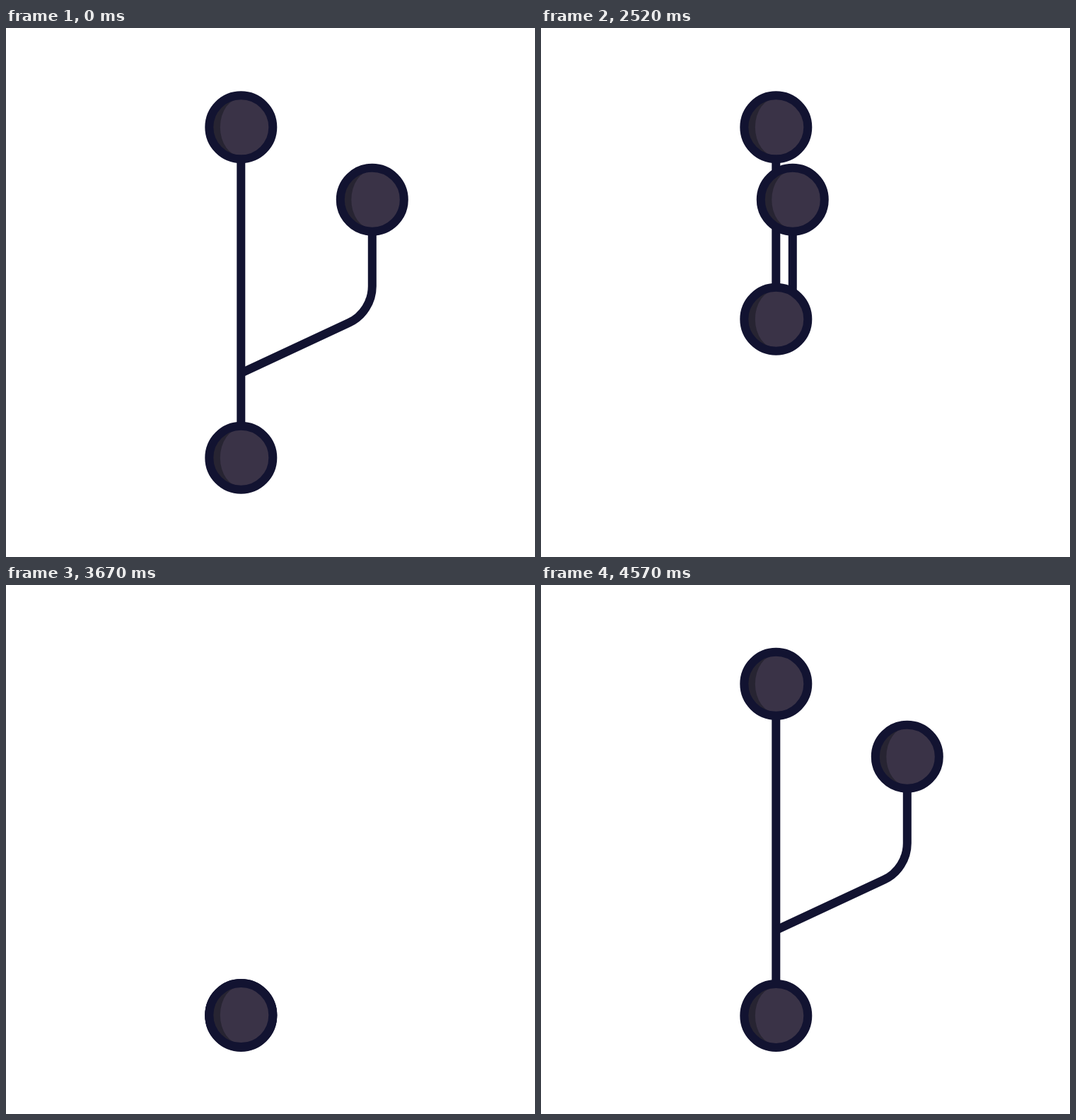
Animation of 748 by 748 pixels, one loop 4.6 s. Source, as an HTML page:

```html
<!DOCTYPE html>
<html lang="en">
<head>
<meta charset="utf-8">
<title>Branch</title>
<style>
  html, body { margin: 0; height: 100%; overflow: hidden; background: #fff; }
  svg { display: block; width: 100vw; height: 100vh; }
  .line, .ring { fill: none; stroke: #121331; stroke-width: 12; }
  .shade { fill: #272432; }
  .light { fill: #3a3347; }
</style>
</head>
<body>
<svg viewBox="0 0 748 748">
  <path id="trunk" class="line"/>
  <path id="branch" class="line"/>
  <g id="bottom"></g>
  <g id="top"></g>
  <g id="tip"></g>
</svg>
<script>
const LOOP = 4600, X = 332.3, TIP_X = 517.8, RADIUS = 45;
const TOP_Y = 140.3, TIP_Y = 242.7, APEX_Y = 105.3, FLOOR_Y = 609;
const VANISH = 3375, SPLIT = 3920;

const [trunk, branch, bottom, top_, tip] =
  ['trunk', 'branch', 'bottom', 'top', 'tip'].map(id => document.getElementById(id));

const mix = (a, b, p) => a + (b - a) * p;
const progress = (t, start, end) => Math.min(1, Math.max(0, (t - start) / (end - start)));
const cubicInOut = u => u < .5 ? 4 * u ** 3 : 1 - 4 * (1 - u) ** 3;
const easeOut = (u, n) => 1 - (1 - u) ** n;

// cubic-bezier(x1, 0, x2, 1), solved by bisection
function bezier(u, x1, x2) {
  let lo = 0, hi = 1;
  for (let i = 0; i < 24; i++) {
    const s = (lo + hi) / 2, r = 1 - s;
    if (3 * x1 * s * r * r + 3 * x2 * s * s * r + s ** 3 < u) lo = s; else hi = s;
  }
  return lo * lo * (3 - 2 * lo);
}

for (const ball of [bottom, top_, tip]) {
  ball.innerHTML = `<circle class="shade"/>
    <path class="light" d="M0-41A29.5 41 0 0 0 0 41A41 41 0 0 0 0-41"/>
    <circle class="ring"/>`;
}

function place(ball, x, y, r) {
  const [shade, light, ring] = ball.children;
  ball.setAttribute('transform', `translate(${x} ${y})`);
  ball.style.display = r > 0 ? '' : 'none';
  shade.setAttribute('r', r);
  ring.setAttribute('r', r);
  light.setAttribute('transform', `scale(${r / RADIUS})`);
}

// Branch squeezed sideways towards the trunk and never lower than the limit
function branchPath(width, limit) {
  const at = (x, y) => `${X + (x - X) * width} ${Math.min(y, limit)}`;
  return `M${at(X, 488)}L${at(485, 416.8)}` +
    `C${at(505, 407.5)} ${at(TIP_X, 387)} ${at(TIP_X, 365)}L${at(TIP_X, TIP_Y)}`;
}

function draw(t) {
  let bottomY, topY, tipX, tipY, r;
  if (t < VANISH) {
    // Collapse upwards into one ball, then shrink away
    const width = 1 - cubicInOut(progress(t, 2000, 2762));
    bottomY = mix(607.7, APEX_Y, cubicInOut(progress(t, 2000, 3132)));
    topY = Math.min(TOP_Y, bottomY);
    tipX = mix(X, TIP_X, width);
    tipY = Math.min(TIP_Y, bottomY);
    r = RADIUS * (1 - progress(t, 3090, VANISH) ** 2);
    branch.setAttribute('d', branchPath(width, bottomY));
    branch.setAttribute('stroke-dasharray', 'none');
  } else {
    // Pop up at the bottom, then grow the trunk and the branch
    bottomY = FLOOR_Y;
    topY = mix(FLOOR_Y, 139.8, bezier(progress(t, 3632, 4589), .55, .1));
    r = RADIUS * easeOut(progress(t, VANISH, 3630), 2);
    branch.setAttribute('d', branchPath(1, FLOOR_Y));
    const length = branch.getTotalLength() * easeOut(progress(t, SPLIT, 4580), 2.33);
    branch.setAttribute('stroke-dasharray', `${length} 999`);
    const end = branch.getPointAtLength(length);
    tipX = end.x;
    tipY = t < SPLIT ? topY : end.y;
  }
  trunk.setAttribute('d', `M${X} ${topY}V${bottomY}`);
  place(bottom, X, bottomY, r);
  place(top_, X, topY, r);
  place(tip, tipX, tipY, r);
}

function frame() {
  draw(performance.now() % LOOP);
  requestAnimationFrame(frame);
}
frame();
</script>
</body>
</html>
```
